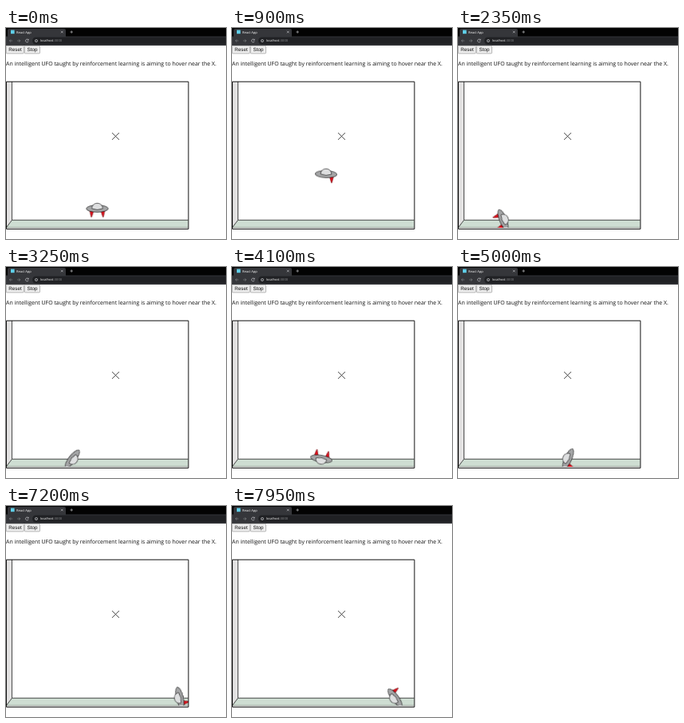
An HTML page that plays this animation: 276x264 px, repeating every 8000 ms.

```html
<!DOCTYPE html>
<html lang="en">
<head>
<meta charset="utf-8">
<title>UFO</title>
<style>
  html, body { margin: 0; width: 100%; height: 100%; overflow: hidden; background: #fff; }
  svg { display: block; width: 100%; height: 100%; }
  text { font-family: "Open Sans", "Noto Sans", sans-serif; text-rendering: geometricPrecision; }
  .chrome { font-size: 4px; font-weight: 500; fill: #fff; }
  .button { font: 6.3px "Liberation Sans", Arial, sans-serif; fill: #111; }
  .icon { fill: none; stroke: #d4d6d9; stroke-width: .6; }

  .x, .turn, .y, .flame { animation: 8s linear infinite; }
  .x { animation-name: slide; }
  .y { animation-name: lift; }
  .turn { animation-name: turn; }
  .flame { animation-timing-function: step-end; }
  .left { animation-name: burn-left; }
  .right { animation-name: burn-right; }

  @keyframes slide {
    0% { transform: translateX(114.5px); }
    11.25% { transform: translateX(118px); }
    12.5% { transform: translateX(118px); animation-timing-function: cubic-bezier(.35, 0, .7, .5); }
    21.25% { transform: translateX(93.5px); }
    27.5% { transform: translateX(62px); animation-timing-function: ease-out; }
    29.375% { transform: translateX(56.5px); animation-timing-function: ease-in; }
    33.75% { transform: translateX(64px); }
    42.5% { transform: translateX(88.5px); }
    51.25% { transform: translateX(112px); }
    63.75% { transform: translateX(141px); }
    73.125% { transform: translateX(171.5px); }
    83.75% { transform: translateX(201px); }
    88.75% { transform: translateX(217.5px); }
    90% { transform: translateX(218px); animation-timing-function: ease-in; }
    95.625% { transform: translateX(214px); }
    99.375% { transform: translateX(204.5px); }
    100% { transform: translateX(202.8px); }
  }
  @keyframes lift {
    0% { transform: translateY(226px); animation-timing-function: cubic-bezier(.4, 0, .7, .45); }
    11.25% { transform: translateY(183px); animation-timing-function: cubic-bezier(.33, .67, .67, 1); }
    17.5% { transform: translateY(158px); animation-timing-function: cubic-bezier(.33, 0, .67, .33); }
    28.75% { transform: translateY(239.5px); }
    29.375%, 100% { transform: translateY(240px); }
  }
  @keyframes turn {
    0% { transform: rotate(0deg); }
    11.25% { transform: rotate(2deg); animation-timing-function: ease-in-out; }
    18% { transform: rotate(-27deg); animation-timing-function: ease-in; }
    24% { transform: rotate(10deg); }
    29.375% { transform: rotate(68deg); }
    42.5% { transform: rotate(138deg); }
    51.25% { transform: rotate(190deg); }
    63.75% { transform: rotate(306deg); }
    73.125% { transform: rotate(398deg); }
    83.75% { transform: rotate(548deg); animation-timing-function: ease-out; }
    90% { transform: rotate(617deg); animation-timing-function: ease-in; }
    99.375% { transform: rotate(593deg); }
    100% { transform: rotate(591deg); }
  }
  @keyframes burn-left {
    0%, 13.75%, 27.5%, 46.25%, 60%, 85%, 100% { opacity: 1; }
    10%, 21.25%, 36.25%, 55%, 68.75%, 94.375% { opacity: 0; }
  }
  @keyframes burn-right {
    0%, 21.25%, 45%, 70%, 96.25%, 100% { opacity: 1; }
    15%, 35%, 58.75%, 86.25% { opacity: 0; }
  }
</style>
</head>
<body>
<svg viewBox="0 0 276 264" preserveAspectRatio="none">
  <defs>
    <clipPath id="room"><path d="M1 67.5H228.6V249.5H1Z"/></clipPath>
    <path id="jet" d="M-2.5 3L2.5 3L.4 10.5H-.4Z" fill="#e00c18" stroke="#54181a" stroke-width=".5"/>
  </defs>

  <path d="M0 0H276V11H0Z" fill="#030303"/>
  <path d="M2 11V2.5Q2 1 4 1H73Q75 1 75 3V11Z" fill="#35363a"/>
  <path d="M0 10.5H276V22H0Z" fill="#35363a"/>
  <rect x="33" y="11.5" width="250" height="9" rx="4.5" fill="#202124"/>
  <rect x="6" y="2.6" width="4.6" height="4.6" fill="#5fcfe9"/>
  <text class="chrome" x="13" y="6.6">React App</text>
  <path class="icon" d="M69 3.7l2.6 2.6m0-2.6L69 6.3M80.5 5h3.4m-1.7-1.7v3.4"/>
  <path class="icon" d="M28 14.9A1.9 1.9 0 1 0 28.2 16.6M28.2 13.7v1.5h-1.5"/>
  <path class="icon" d="M8.2 16H4.4m1.7-1.7L4.4 16l1.7 1.7M14 16h3.8m-1.7-1.7l1.7 1.7l-1.7 1.7" opacity=".5"/>
  <circle class="icon" cx="38" cy="16" r="1.6"/>
  <path class="icon" d="M38 15.6v1.2"/>
  <text class="chrome" x="43" y="17.4">localhost<tspan fill="#8f9194">:3000</tspan></text>

  <g fill="#efefef" stroke="#8c8c8c" stroke-width=".6">
    <rect x=".3" y="22.2" width="22" height="9.7" rx="1"/>
    <rect x="23.3" y="22.2" width="19.2" height="9.7" rx="1"/>
  </g>
  <text class="button" x="3.2" y="29.4">Reset</text>
  <text class="button" x="26.5" y="29.4">Stop</text>
  <text x="0" y="47.2" font-size="6.97" fill="#111">An intelligent UFO taught by reinforcement learning is aiming to hover near the X.</text>

  <path d="M.5 67H7.5V240.3L.5 249.5Z" fill="#e3e2e2"/>
  <path d="M7.5 240.3H228.5V249.5H.5Z" fill="#ceddd2"/>
  <path d="M7.5 67V240.3H228.5M7.5 240.3L.5 249.5" fill="none" stroke="#222" stroke-width=".8"/>
  <path d="M.5 249.5H228.5" stroke="#59665d" stroke-width=".6"/>
  <path d="M133 131.1l9 8.8m0-8.8l-9 8.8" stroke="#222" stroke-width=".8"/>

  <g clip-path="url(#room)">
    <g class="x"><g class="y"><g class="turn">
      <g class="flame left"><use href="#jet" transform="translate(-6.8) rotate(3)"/></g>
      <g class="flame right"><use href="#jet" transform="translate(6.8) rotate(-3)"/></g>
      <g stroke="#222" stroke-width=".7">
        <ellipse rx="13.7" ry="4.4" fill="#a5a6a7"/>
        <path d="M-6.8 0C-6.8-9 6.8-9 6.8 0Q0 2.8-6.8 0Z" fill="#dedfe0"/>
      </g>
    </g></g></g>
  </g>
  <path d="M.5 67.2H228.9V251.5H.5Z" fill="none" stroke="#111"/>
</svg>
</body>
</html>
```
